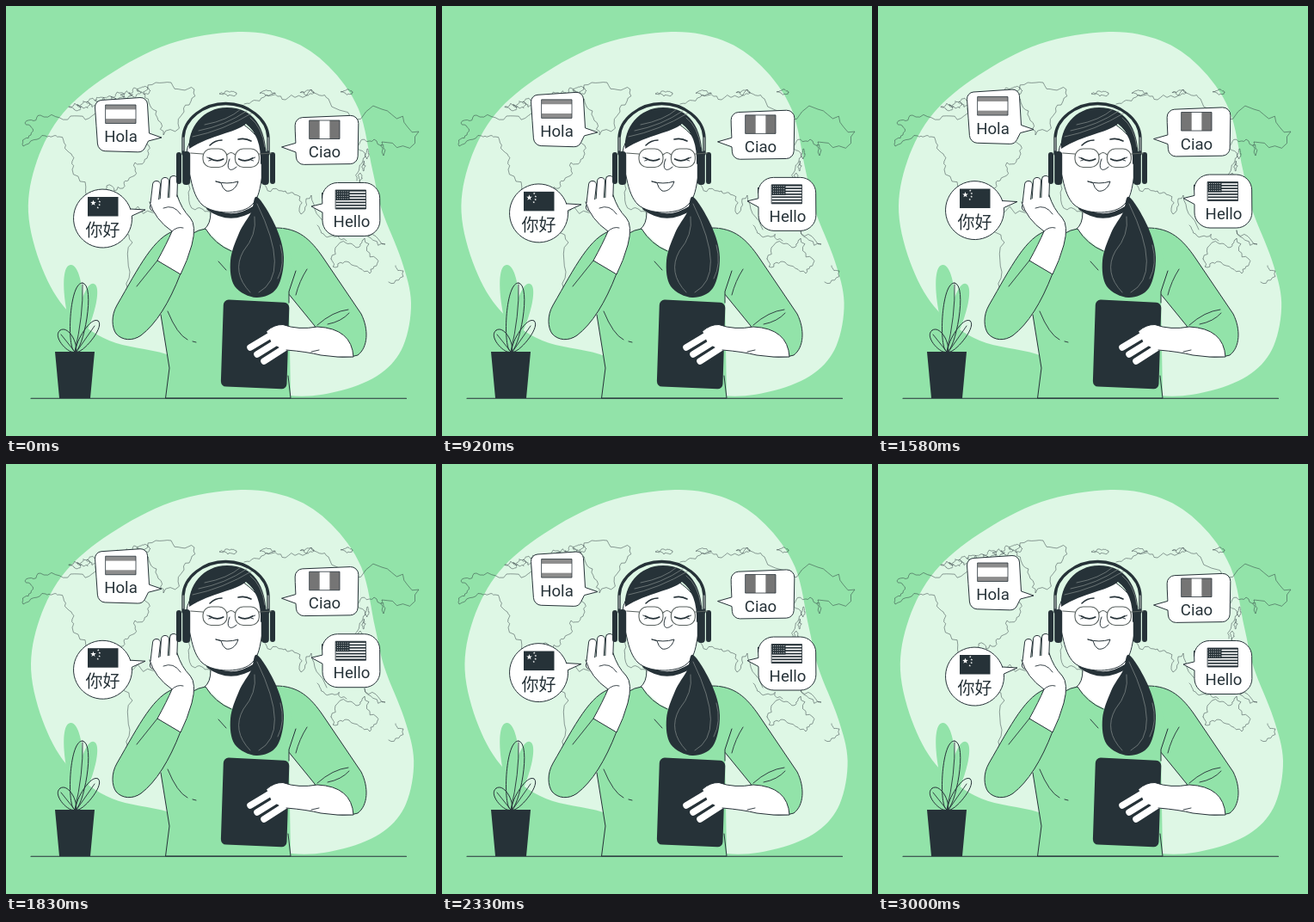
Write an HTML page with a canvas that moves like this. It is 500 by 500 pixels and loops after 3040 ms.

```html
<!DOCTYPE html>
<html lang="en">
<head>
<meta charset="utf-8">
<title>Hello in four languages</title>
<style>
html, body { margin: 0; width: 100%; height: 100%; overflow: hidden; background: #92e3a9; }
canvas { display: block; width: 500px; height: 500px; }
</style>
</head>
<body>
<canvas id="stage"></canvas>
<script>
const GREEN = '#92e3a9', PALE = '#def7e5', DARK = '#263238', WHITE = '#fff', STRAND = '#87908f';
const LOOP = 3040, CYCLE = 3000;
const canvas = document.getElementById('stage');
const ctx = canvas.getContext('2d');
const ratio = window.devicePixelRatio || 1;
canvas.width = canvas.height = 500 * ratio;

// Drawing helpers
function shape(path, fill, stroke = DARK, width = 1) {
  if (typeof path === 'string') path = new Path2D(path);
  if (fill) { ctx.fillStyle = fill; ctx.fill(path); }
  if (stroke) { ctx.strokeStyle = stroke; ctx.lineWidth = width; ctx.stroke(path); }
}
const line = (path, width = 1, color = DARK) => shape(path, null, color, width);
const points = text => text.split(' ').map(p => p.split(',').map(Number));

function rect(x, y, w, h, color) {
  ctx.fillStyle = color;
  ctx.fillRect(x, y, w, h);
}
function pill(x, y, w, h, r) {
  const path = new Path2D();
  path.roundRect(x, y, w, h, r);
  return path;
}
// Smooth closed curve through key points
function smooth(text) {
  const p = points(text), n = p.length, path = new Path2D();
  path.moveTo(...p[0]);
  for (let i = 0; i < n; i++) {
    const [a, b, c, d] = [n - 1, 0, 1, 2].map(k => p[(i + k) % n]);
    path.bezierCurveTo(b[0] + (c[0] - a[0]) / 6, b[1] + (c[1] - a[1]) / 6,
      c[0] - (d[0] - b[0]) / 6, c[1] - (d[1] - b[1]) / 6, ...c);
  }
  path.closePath();
  return path;
}
// Polygon of "x,y,radius" corners
function rounded(text) {
  const p = points(text), n = p.length, path = new Path2D();
  path.moveTo((p[0][0] + p[n - 1][0]) / 2, (p[0][1] + p[n - 1][1]) / 2);
  p.forEach(([x, y, r = 0], i) => path.arcTo(x, y, p[(i + 1) % n][0], p[(i + 1) % n][1], r));
  path.closePath();
  return path;
}
function placed(x, y, draw) {
  ctx.save();
  ctx.translate(x, y);
  draw();
  ctx.restore();
}
function mirrored(axis, draw) {
  for (const side of [1, -1]) {
    placed(axis, 0, () => { ctx.scale(side, 1); draw(); });
  }
}
function limb(x1, y1, x2, y2, width) {
  const d = `M${x1},${y1}L${x2},${y2}`;
  line(d, width + 1);
  line(d, width - 1, WHITE);
}
function label(text, x, y, font = '18.6px Roboto, Inter, sans-serif') {
  ctx.font = font;
  ctx.textAlign = 'center';
  ctx.fillStyle = DARK;
  ctx.fillText(text, x, y);
}

// World map: key points roughened by seeded midpoint displacement
let seed = 11;
const rand = () => (seed = (seed * 16807) % 2147483647) / 2147483647;

function roughen(pts) {
  const out = [pts[0]];
  for (let i = 1; i < pts.length; i++) {
    const [ax, ay] = pts[i - 1], [bx, by] = pts[i], k = (rand() - 0.5) * 0.6;
    out.push([(ax + bx) / 2 - (by - ay) * k, (ay + by) / 2 + (bx - ax) * k], [bx, by]);
  }
  return out;
}
function coast(pts) {
  for (let i = 0; i < 3; i++) pts = roughen(pts);
  return 'M' + pts.map(p => p.map(v => v.toFixed(1)).join()).join('L');
}
function island(x, y, rx, ry) {
  const ring = [0, 1, 2, 3, 0].map(i => [x + rx * Math.cos(i * 1.57), y + ry * Math.sin(i * 1.57)]);
  return coast(ring);
}
const shores = [
  '104,119 75,128 40,127 22,136 29,150 20,163 46,151 62,152 76,172 77,190 98,225',
  '164,134 153,152 166,172 150,182 142,203 136,212 117,209 116,226',
  '142,330 147,275 139,244 170,240 197,259',
  '160,100 192,89 219,97 207,123 183,150 175,122 160,100',
  '277,114 300,106 325,109 355,97 375,108 437,120 480,146 437,158 439,174 428,155 409,163 415,180 408,203',
  '300,205 321,215 335,219 343,242 355,220 373,260',
  '213,204 220,237 238,241',
  '378,294 396,276 411,280 417,270 431,294 423,311 399,298 380,303 378,294',
  '417,261 441,277 417,261',
  '362,255 376,268 396,273',
  '453,302 462,308 445,321'
].map(s => coast(points(s)));
for (let i = 0; i < 9; i++) shores.push(island(80 + i * 10, 117 - i * 2.3, 5 + 4 * rand(), 3 + 3 * rand()));
for (let i = 0; i < 4; i++) shores.push(island(258 + i * 46, 102 - i * 0.6, 10 - i, 3));
for (let i = 0; i < 3; i++) shores.push(island(420 - i * 4, 172 + i * 14, 2, 6));
const map = new Path2D(shores.join(''));

const blob = smooth('270,30 330,40 375,70 410,120 426,190 437,237 460,296 471,345 462,395 436,427 390,447 330,453 ' +
  '255,432 187,405 120,389 72,355 42,305 26,240 36,180 66,125 118,81 190,44');

function leaf(x, y, tipX, tipY, w) {
  const nx = (y - tipY) * w, ny = (tipX - x) * w;
  const side = s => `C${x + nx * s * 0.6},${y + ny * s * 0.6} ${tipX + nx * s},${tipY + ny * s} ${tipX},${tipY}`;
  return `M${x},${y}${side(1)}M${x},${y}${side(-1)}`;
}
function plant() {
  shape(leaf(84, 388, 75, 301, 0.2), GREEN, null);
  shape(leaf(84, 392, 102, 323, 0.2), GREEN, null);
  line(leaf(80, 402, 89, 322, 0.2) + leaf(80, 402, 63, 377, 0.42) + leaf(82, 402, 107, 366, 0.26));
  line('M89,324Q90,360 80,402L64,382M82,402L103,372', 0.9);
  shape('M57,402H103L98,456H62Z', DARK, null);
}

function body() {
  shape('M238,232Q240,252 231,259L263,288L312,258L290,230Z', WHITE, null);
  line('M238,240Q238,254 231,259');
  // far arm
  shape('M314,258C340,258 354,271 369,293L413,358C422,376 421,397 409,406Q395,411 370,405L359,372L328,334Z', GREEN);
  // torso
  shape('M232,259Q224,260 216,265L180,359L190,421L185.5,456H331L329,336L337,310L322,258L290,290L264,285Q243,277 232,259Z', GREEN, null);
  line('M262,285Q243,277 232,259Q224,260 216,265M180,359L190,421L185.5,456H331L328,430M329,345V332L337,308');
  line('M188,355Q199,382 211,388M217,390L221,391M247,297L256,307M350,306Q341,320 337,336', 0.9);
  line('M362,371Q380,355 398,353M374,370Q390,367 399,357', 0.9);
}

function tablet() {
  shape(rounded('253,341.3,6 329.500,345,6 326.300,445.500,6 249.700,442.300,6'), DARK, null);
  for (let i = 2; i >= 0; i--) limb(284 + 8 * i, 397 + 8 * i, 314 + 7 * i, 379 + 8 * i, 8.5);
  shape('M362,373Q340,377 322,370.500Q312,370 303,378L309,392L323,400Q350,403 366,406Q385,409 404,408Q402,375 362,373Z', WHITE, null);
  line('M303,378Q312,370 322,370.500Q340,377 362,373Q402,375 404,408Q385,409 366,406Q350,402 326,400');
  line('M355,402L364,400', 0.9);
}

function raisedArm() {
  shape('M197,261C172,268 155,303 129,348C122,360 123,374 128,381C135,389 147,390 157,383Q183,363 203,311L214,268Z', GREEN);
  line('M176,296L152,326', 0.9);
  for (let i = 2; i >= 0; i--) limb(175 + 10 * i, 208 - 4 * Math.min(i, 1.5), 172 + 11 * i, 234, 9);
  shape('M176,296Q187,276 193,262Q173,248 167,230L180,224L199,222Q204,236 214,246Q222,255 216,278Q211,296 203,312Z', WHITE, null);
  line('M167,228Q173,248 193,262Q187,276 176,296L203,312Q211,296 216,278Q222,255 214,246Q204,236 199,220');
  line('M183,235Q195,230 203,242M193,262Q199,256 206,258', 0.9);
}

function head() {
  line('M236,235Q261,253 289,235', 5.5);
  shape(smooth('213,160 215,202 228,231 256,240 284,233 296,208 297,160 256,130'), WHITE);
  // hair with a side parting
  shape('M213,166C211,142 229,118 257,118C287,118 303,140 303,180L296,184C297,162 291,146 279,137C266,148 240,149 213,166Z', DARK, null);
  for (let i = 0; i < 3; i++) line(`M${217 + 7 * i},${152 - 7 * i}Q${252 + 3 * i},${145 - 6 * i} ${287 - 7 * i},${124 - 2 * i}`, 0.7, STRAND);
  line('M284,130Q298,141 301,164', 0.7, STRAND);

  line('M206,172V153C207,131 230,113.500 255.5,113.500C281,113.500 304,131 305,153V172', 3.4);
  mirrored(255.5, () => {
    line('M-49.5,168V153', 1, '#cfd6d3');
    shape(pill(-57.5, 170, 6, 37, 3), DARK, null);
    shape(pill(-50.3, 169, 9, 39, 4), DARK, null);
  });

  mirrored(261.7, () => {
    line(pill(-32.7, 166, 28, 21.5, 9.5), 1.1, '#59615f');
    line('M-33,172L-47,171M-4.7,173Q-2,170.500 0,170.500', 1.1, '#59615f');
    line('M-25,177Q-17,182 -9,178', 1.7);
    line('M-25,177L-28,176M-23,179L-26,180', 0.9);
  });
  line('M237,162Q243,156 251,156M270,155Q278,153 285,157', 1.6);
  line('M260,178C255,190 261,194 268,187');
  shape('M244,204Q257,208 270,204C267,214 260,216 256,215Q252,213 250,206Z', WHITE);
}

function ponytail() {
  shape(smooth('292,222 313,255 323,292 315,328 291,339 266,326 261,296 271,264 285,240'), DARK, null);
  line('M292,230Q332,312 294,333M289,245Q292,266 276,285Q262,310 284,333M319,278Q325,300 316,317', 0.7, STRAND);
}

// Flags and speech bubbles
function tricolor(x, y, tone, upright) {
  const w = 35, h = 21.5;
  rect(x, y, w, h, WHITE);
  for (const side of [0, 1]) {
    if (upright) rect(x + side * w * 2 / 3, y, w / 3, h, tone);
    else rect(x, y + side * h * 3 / 4, w, h / 4, tone);
  }
  line(pill(x, y, w, h, 0), 0.8);
}
function stripes(x, y) {
  rect(x, y, 35, 22, WHITE);
  for (let i = 0; i < 7; i++) rect(x, y + i * 44 / 13, 35, 22 / 13, DARK);
  rect(x, y, 16, 12, DARK);
  for (let i = 0; i < 24; i++) rect(x + 1.5 + i % 6 * 2.4, y + 1.5 + Math.floor(i / 6) * 2.7, 0.9, 0.9, WHITE);
  line(pill(x, y, 35, 22, 0), 0.8);
}
function star(x, y, r) {
  ctx.beginPath();
  for (let i = 0; i < 10; i++) {
    const a = -Math.PI / 2 + i * Math.PI / 5, q = i % 2 ? r * 0.4 : r;
    ctx.lineTo(x + q * Math.cos(a), y + q * Math.sin(a));
  }
  ctx.fillStyle = WHITE;
  ctx.fill();
}
function starred(x, y) {
  rect(x, y, 35.5, 22.5, DARK);
  star(x + 6.5, y + 7, 3.5);
  for (let i = 0; i < 4; i++) {
    const a = -0.7 + i * 0.5;
    star(x + 6.5 + 7.5 * Math.cos(a), y + 7 + 7.5 * Math.sin(a), 1.4);
  }
}
function bubbles() {
  shape(rounded('103,110,8 164,106,8 166.5,148 181,153 165.5,157 159,170,9 107,168.5,9'), WHITE);
  tricolor(116, 115, '#8d8d8d', false);
  label('Hola', 133.5, 158);

  shape(rounded('336,130,9 410,127,9 409,183.5,9 338,184.5,9 337,170 320.5,164 336.5,159.5'), WHITE);
  tricolor(353, 133, '#757575', true);
  label('Ciao', 370.5, 176);

  shape(rounded('367.5,205.5,18 434.5,205.5,18 435,267.5,18 368,267.5,18 368,240 355,233 367.5,230'), WHITE);
  stripes(383.5, 214);
  label('Hello', 402, 257);

  shape('M144.7,236L162,237L146.400,244A34,34 0 1 1 144.7,236Z', WHITE);
  starred(95, 222);
  label('你好', 112.5, 268, '20px "Noto Sans CJK SC", "Noto Sans CJK", "Noto Sans CJK JP", sans-serif');
}

// Backdrop shake: offsets per tenth of the cycle, symmetric around the middle
const SHAKE = [0, -1, 2, -4, 4, -4];
function shake(p) {
  const u = 10 * Math.min(p, 1 - p), i = Math.min(4, Math.floor(u));
  return SHAKE[i] + (SHAKE[i + 1] - SHAKE[i]) * (u - i);
}
const float = p => -10 * (1 - Math.abs(1 - 2 * p));

function render(now) {
  const p = Math.min(now % LOOP, CYCLE) / CYCLE;
  ctx.setTransform(ratio, 0, 0, ratio, 0, 0);
  ctx.lineJoin = ctx.lineCap = 'round';
  rect(0, 0, 500, 500, GREEN);
  placed(shake(p), 0, () => shape(blob, PALE, null));
  line(map, 0.8, 'rgba(38,50,56,.6)');
  plant();
  body();
  tablet();
  raisedArm();
  head();
  ponytail();
  line('M29,456.200H465.500', 1.1);
  placed(0, float(p), bubbles);
}

const start = performance.now();
function tick() {
  render(performance.now() - start);
  requestAnimationFrame(tick);
}
tick();
</script>
</body>
</html>
```
